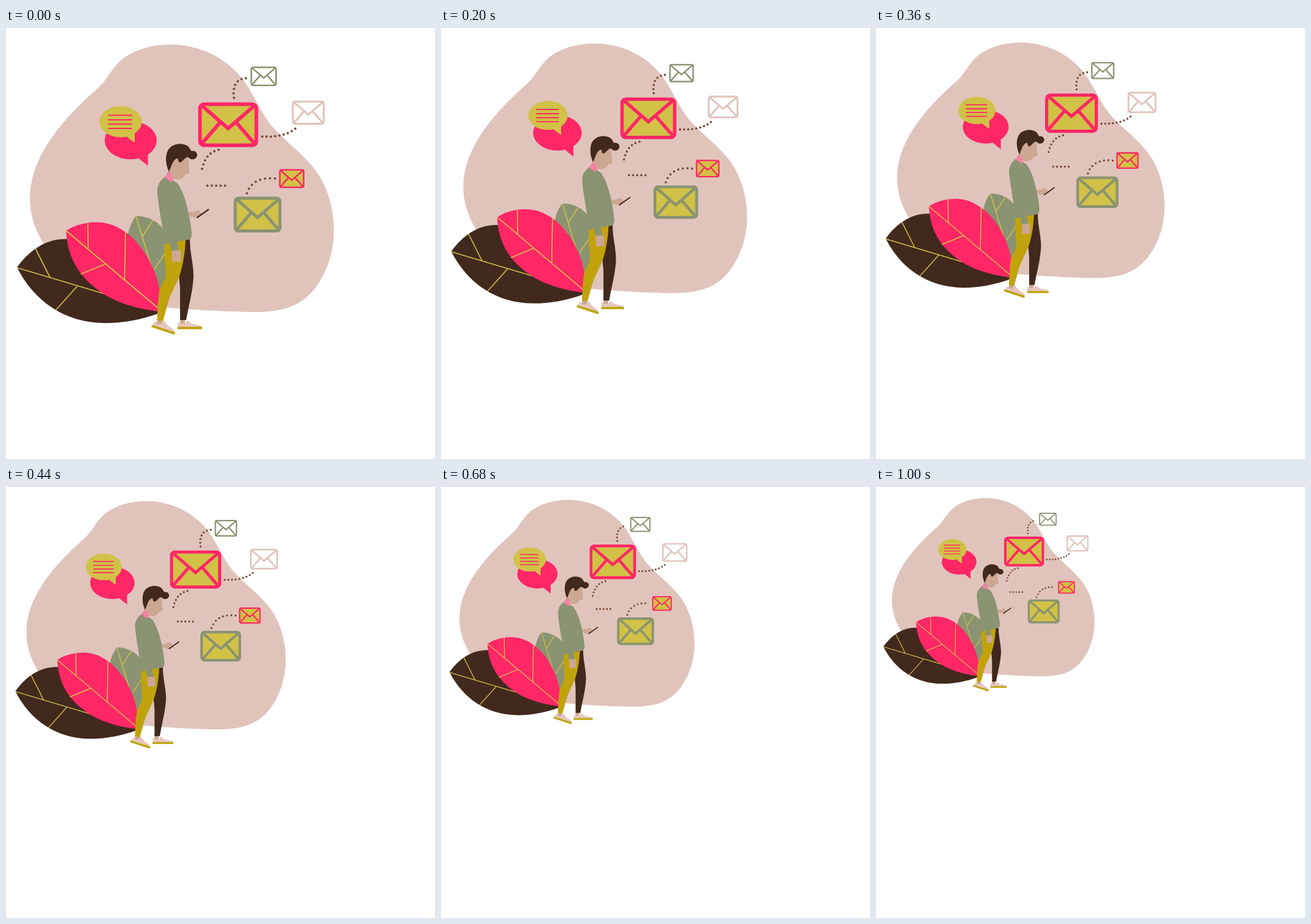
An HTML page for the animation above (1.6 s loop, 700 px wide and 704 px high).

```html
<!DOCTYPE html>
<html lang="en">
<head>
<meta charset="utf-8">
<title>Messages</title>
<style>
  html, body { margin: 0; width: 100%; height: 100%; overflow: hidden; background: #fff; }
  svg { display: block; width: 100vw; height: 100vh; }
  .blob { fill: #e0c4bc; }
  .dark { fill: #42291d; }
  .pink { fill: #ff2766; }
  .green { fill: #8a9372; }
  .lime { fill: #d1c146; }
  .mustard { fill: #c0a30c; }
  .skin { fill: #cca792; }
  .collar { fill: #f282a3; }
  .shoe { fill: #e6c6bf; }
  .vein { fill: none; stroke: #d1c146; stroke-width: 1.7; }
  .dots { fill: none; stroke: #7a4b38; stroke-width: 4; stroke-linecap: round; }
</style>
</head>
<body>
<svg viewBox="0 0 700 704" preserveAspectRatio="xMinYMin meet">
  <g id="scene">
    <path class="blob" d="M268 27C330 27 375 62 396 98C409 120 419 141 432 158C452 182 478 200 500 226C522 252 535 290 535 331C535 385 508 430 482 446C462 460 435 464 405 464C370 464 300 460 255 456L100 400C70 370 39 330 39 278C39 215 85 155 150 98C166 84 166 74 188 52C207 37 235 27 268 27Z"/>

    <g id="trails"></g>
    <g id="envelopes"></g>

    <g id="bubbles">
      <ellipse class="pink" cx="203.5" cy="183.5" rx="42.5" ry="31"/>
      <path class="pink" d="M214 211L231.5 225V201Z"/>
      <ellipse class="lime" cx="187" cy="153" rx="34.5" ry="25.5"/>
      <path class="lime" d="M195 176L210 187.5V168Z"/>
      <path d="M166.500 142.500H206M166.500 150H206M166.500 157H206M166.500 164H206" stroke="#ff2766" stroke-width="2"/>
    </g>

    <g id="leaves">
      <path class="green" d="M212 307C235 307 258 319 268 350C272 385 268 410 256 430C235 420 195 370 199 338C201 325 206 315 212 307Z"/>
      <path class="vein" d="M212 307L248 425M239.500 314L222 341.500M262 364L242 394"/>
      <path class="dark" d="M18 391C40 360 70 342 103 345C170 350 220 410 252 465C220 477 190 482 163 482C95 482 45 445 18 391Z"/>
      <path class="vein" d="M18 391.500L160 434M48 360L72 408M81 461L116 422"/>
      <path class="pink" d="M98 331C125 314 160 313 183 326C225 347 257 410 253 463.500C205 458 170 445 145 424C115 400 100 370 98 331Z"/>
      <path class="vein" d="M98 331L251 460M133.500 318L134 361M195 334L193.500 411M122 402L163 385"/>
    </g>

    <g id="man">
      <path class="skin" d="M284 474H292V485H284ZM247 475L256 477L254 485L246 483Z"/>
      <path class="dark" d="M285 346L300 345C300 368 306 385 306 405C305 430 298 453 294 477H284L284 425L281 390Z"/>
      <path class="mustard" d="M258 352L293 346C292 365 290 385 282 408C276 422 268 436 264 450L256 479L246.500 477C248 455 248 432 253 422C258 412 261 408 260.500 400C259 385 258 370 258 352Z"/>
      <path class="shoe" d="M239 486L244 478L247 483L254 484L257 477L265 487L273 492L276 497.500ZM280.500 488V480L285 483L292 483L296 477.500L303 483L317 486L320 488.500Z"/>
      <path class="mustard" d="M238.500 485L276 497L275 501L237 488.500ZM280 488H320V492H280Z"/>

      <path class="skin" d="M270 362L284 363L286 372L285 382H271Z"/>
      <path class="skin" d="M297 301L307 300L313 297L319 302L315 309L310 310L300 308Z"/>
      <path d="M311.500 310L331 296" stroke="#42291d" stroke-width="2.200"/>
      <path class="green" d="M262 241C250 250 246 257 247 270C249 290 254 320 257.500 337V354L267 351L270 364L282 363L279 349L297 346C303 345 303 340 303 334C300 308 293 272 280 254Z"/>

      <path class="skin" d="M265 236L273 214L297 207L298.500 224L299.500 237L293 239C290 246 283 248 274 246.500Z"/>
      <path class="collar" d="M265 234L273.500 245L270 252L259 244Z"/>
      <path class="dark" d="M266 235C260 223 259 206 266 197C274 188 288 187 297 193C300 196 301 200 303 201C309 200 312 204 312 208C311 213 307 215 303 214.500C299 214 298 210 295 211C291 213 288 218 285 219.500C282 220 281 218 280.500 213C276 213 273 218 271 222Z"/>
    </g>
  </g>
</svg>

<script>
  const LOOP = 1600, STEP = 20, STEPS = 50, END_SCALE = 2 / 3;
  const PINK = '#ff2766', GREEN = '#8a9372', LIME = '#d1c146', BLUSH = '#e0c4bc';
  const byId = id => document.getElementById(id);

  function add(parent, tag, attrs) {
    const node = document.createElementNS('http://www.w3.org/2000/svg', tag);
    for (const key in attrs) node.setAttribute(key, attrs[key]);
    return parent.appendChild(node);
  }

  // x, y, w, h describe the outer edge, including the outline.
  function envelope(x, y, w, h, line, stroke, fill = 'none') {
    const left = x + line / 2, top = y + line / 2;
    const iw = w - line, ih = h - line;
    const px = f => left + iw * f, py = f => top + ih * f;
    const group = add(byId('envelopes'), 'g', { fill: 'none', stroke, 'stroke-width': line });
    add(group, 'rect', { x: left, y: top, width: iw, height: ih, rx: h * 0.09, fill });
    add(group, 'path', {
      d: `M${px(0.02)} ${py(0.02)}L${px(0.5)} ${py(0.59)}L${px(0.98)} ${py(0.02)}` +
         `M${px(0.02)} ${py(0.98)}L${px(0.36)} ${py(0.44)}` +
         `M${px(0.98)} ${py(0.98)}L${px(0.64)} ${py(0.44)}`
    });
  }

  function trail(d, count) {
    add(byId('trails'), 'path', {
      d, class: 'dots', pathLength: count - 0.99, 'stroke-dasharray': '0 1'
    });
  }

  envelope(313.5, 121.5, 98, 73, 6, PINK, LIME);
  envelope(371.5, 275.5, 78, 58.5, 5, GREEN, LIME);
  envelope(445.5, 230.5, 41.5, 31, 2.6, PINK, LIME);
  envelope(466.5, 118.5, 53.5, 39.5, 3.2, BLUSH);
  envelope(399, 63, 43, 32, 2.6, GREEN);

  trail('M372 114C369 95 376 83 391.500 82', 7);
  trail('M418 177.500C436 178 456 177 472 164.500', 9);
  trail('M320 230C324 212 333 202 347 199', 7);
  trail('M328.500 257.500H357.500', 5);
  trail('M393 270C399 252 415 243 439 246', 8);

  function draw(time) {
    const step = Math.min(STEPS, Math.floor((time % LOOP) / STEP));
    const scale = 1 - (1 - END_SCALE) * step / STEPS;
    byId('scene').setAttribute('transform', `scale(${scale})`);
  }

  const start = performance.now();
  function tick() {
    draw(performance.now() - start);
    requestAnimationFrame(tick);
  }
  tick();
</script>
</body>
</html>
```
